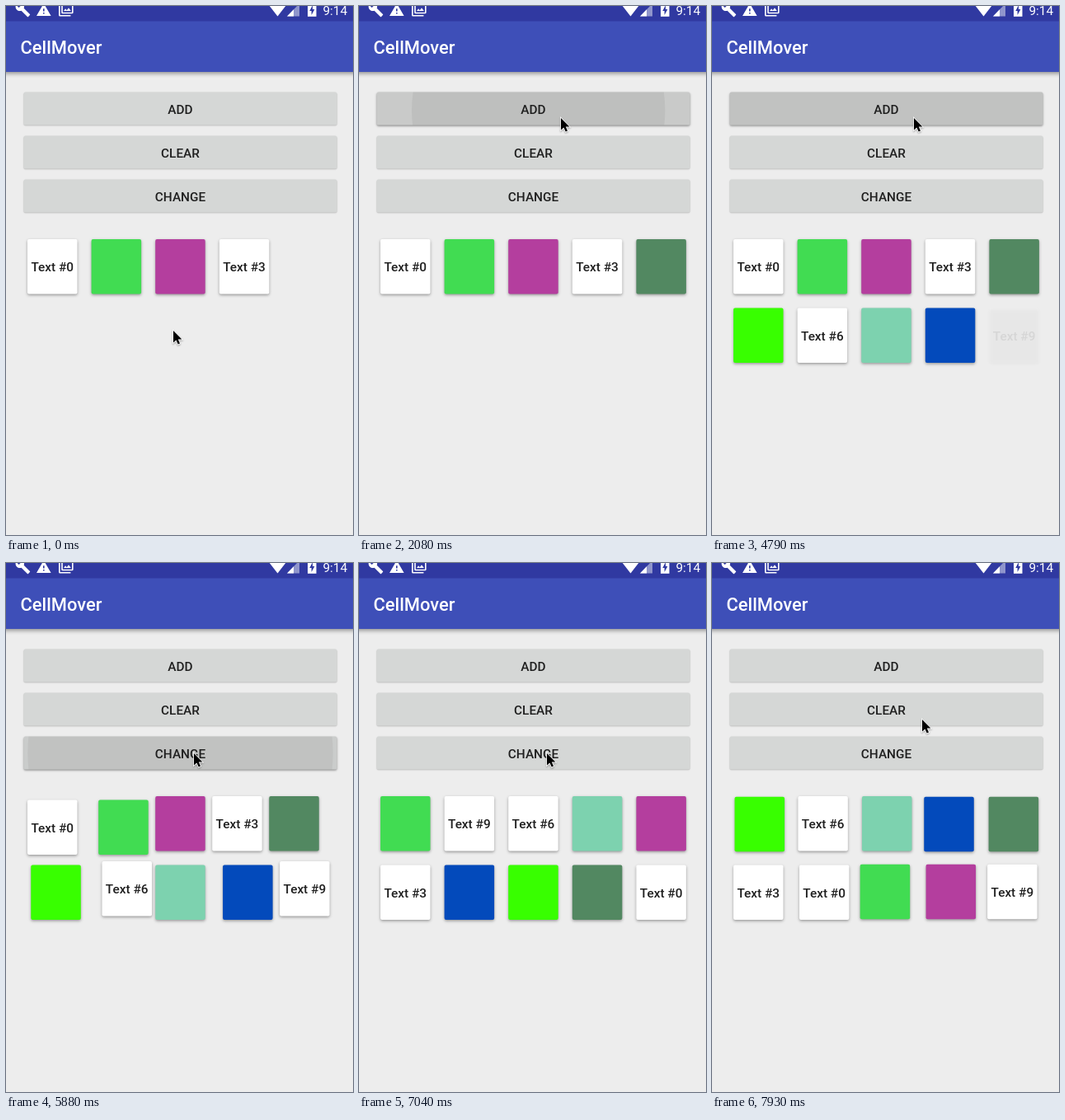
Animation of 421x642 px, one loop 7990 ms. Source, as an HTML page with a canvas:

```html
<!DOCTYPE html>
<html lang="en">
<head>
<meta charset="utf-8">
<title>Tile shuffle</title>
<style>
html, body { margin: 0; overflow: hidden; }
canvas { display: block; }
</style>
</head>
<body>
<canvas id="stage" width="421" height="642"></canvas>
<script>
const ctx = document.getElementById('stage').getContext('2d');
const LOOP = 7990;
const INK = '#1f1f1f';

const BUTTONS = [['ADD', 104.5], ['CLEAR', 157.5], ['CHANGE', 210.5]];
const COLORS = ['#fff', '#41dc52', '#b43e9e', '#fff', '#528861', '#38ff00', '#fff', '#7dd2af', '#034abb', '#fff'];

// button index, touch, ripple start, release
const CLICKS = [
  [0, 1150, 1200, 1380], [0, 1740, 1890, 2090], [0, 2550, 2590, 2760],
  [0, 3120, 3200, 3440], [0, 3760, 3830, 4050], [0, 4290, 4480, 4760],
  [2, 5620, 5645, 5847], [2, 6650, 6780, 6800], [2, 7550, 7570, 7650]
];
const FADE = 220;

// time each tile appears, after the first four
const ADDED = [1380, 2090, 2760, 3380, 4030, 4780];

const SHUFFLES = [
  { start: 5847, length: 225, order: '4329605718' },
  { start: 6800, length: 235, order: '1967238540' },
  { start: 7650, length: 300, order: '5678430129' }
];

const POINTER = [
  [30, 203, 394], [180, 163, 290], [440, 216, 138], [1150, 216, 138], [1300, 245, 136],
  [5000, 245, 136], [5290, 229, 230], [5440, 228, 231], [7740, 228, 231], [7930, 255, 190]
];

const ARROW = new Path2D('M0 0V14.6L3.4 11.5 5.7 16.6 8 15.6 5.8 10.6H10.4Z');
const ICONS = [
  [10.8, -5.2, 'M22.7 19l-9.1-9.1c.9-2.3.4-5-1.5-6.9-2-2-5-2.4-7.4-1.3L9 6 6 9 1.6 4.7C.4 7.1.9 10.1 2.9 12.1c1.9 1.9 4.6 2.4 6.9 1.5l9.1 9.1c.4.4 1 .4 1.4 0l2.3-2.3c.5-.4.5-1.1.1-1.4z'],
  [36.2, -4.8, 'M1 21h22L12 2zM13 18h-2v-2h2zM13 14h-2v-4h2z'],
  [63.2, -5.9, 'M16 10.3l-2.8 3.5-2-2.3L8.5 15h11zM3 5H1v16q0 2 2 2h16v-2H3zM21 1H7Q5 1 5 3v14q0 2 2 2h14q2 0 2-2V3q0-2-2-2zM21 17H7V3h14z']
].map(([x, y, d]) => [x, y, new Path2D(d)]);

const clamp = v => Math.max(0, Math.min(1, v));
const mix = (a, b, k) => a + (b - a) * k;
const ease = k => (1 - Math.cos(Math.PI * clamp(k))) / 2;

function shadow(alpha, blur, y) {
  ctx.shadowColor = `rgba(0,0,0,${alpha})`;
  ctx.shadowBlur = blur;
  ctx.shadowOffsetY = y;
}

function box(x, y, w, h, color) {
  ctx.fillStyle = color;
  ctx.beginPath();
  ctx.roundRect(x, y, w, h, 2);
  ctx.fill();
}

function text(str, x, y, size = 15.35, color = INK, align = 'center', weight = 500) {
  ctx.font = `${weight} ${size}px Roboto, sans-serif`;
  ctx.textAlign = align;
  ctx.fillStyle = color;
  ctx.fillText(str, x, y);
}

function polygon(color, ...points) {
  ctx.fillStyle = color;
  ctx.beginPath();
  points.forEach(([x, y]) => ctx.lineTo(x, y));
  ctx.fill();
}

function drawBars() {
  ctx.save();
  shadow(.4, 5, 2);
  ctx.fillStyle = '#3e4fb8';
  ctx.fillRect(-10, 0, 441, 80);
  ctx.restore();
  ctx.fillStyle = '#3039a1';
  ctx.fillRect(0, 0, 421, 18.5);
  text('CellMover', 17.5, 58, 21.9, '#fff', 'left');

  for (const [x, y, path] of ICONS) {
    ctx.save();
    ctx.translate(x, y);
    ctx.scale(.8, .8);
    ctx.fillStyle = '#fff';
    ctx.fill(path, 'evenodd');
    ctx.restore();
  }
  polygon('#fff', [319, -1], [329.5, 12.5], [340, -1]);
  polygon('#8f95cc', [341, 12.5], [356, 12.5], [356, -3]);
  polygon('#fff', [341, 12.5], [349, 12.5], [349, 4.3]);
  ctx.fillStyle = '#fff';
  ctx.fillRect(366, -3, 10.5, 15.8);
  polygon('#3039a1', [372, -1], [368.3, 6], [370.6, 6], [370.6, 11], [374.4, 4], [372, 4]);
  text('9:14', 414, 11, 15.35, '#fff', 'right', 400);
}

function pointerAt(t) {
  const next = POINTER.findIndex(p => p[0] > t);
  if (next === 0) return POINTER[0].slice(1);
  if (next < 0) return POINTER.at(-1).slice(1);
  const [a, b] = [POINTER[next - 1], POINTER[next]];
  const k = (t - a[0]) / (b[0] - a[0]);
  return [mix(a[1], b[1], k), mix(a[2], b[2], k)];
}

function drawButton([label, y], index, t, pointer) {
  const click = CLICKS.find(c => c[0] === index && t >= c[1] && t < c[3] + FADE);
  let level = 0;
  if (click) level = clamp((t - click[1]) / 80) * (1 - clamp((t - click[3]) / FADE));

  ctx.save();
  shadow(.22 + .2 * level, 1.5 + level, .8 + .5 * level);
  box(21.5, y, 380, 40, '#d5d7d6');
  ctx.restore();

  if (click) {
    ctx.save();
    box(21.5, y, 380, 40, `rgba(0,0,0,${.06 * level})`);
    ctx.clip();
    if (t >= click[2]) {
      const radius = 20 + .7 * (t - click[2]);
      const k = clamp((radius - 20) / 164);
      ctx.fillStyle = `rgba(0,0,0,${.055 * level})`;
      ctx.beginPath();
      ctx.arc(mix(pointer[0], 211.5, k), mix(pointer[1], y + 20, k), radius, 0, 7);
      ctx.fill();
    }
    ctx.restore();
  }
  text(label, 211.5, y + 26);
}

function slot(i) {
  return [26 + 77.6 * (i % 5), i < 5 ? 283 : 366.5];
}

function drawTile(id, t) {
  const alpha = id < 4 ? 1 : clamp((t - ADDED[id - 4]) / 130);
  if (!alpha) return;
  let [x, y] = slot(id);
  for (const { start, length, order } of SHUFFLES) {
    const [toX, toY] = slot(order.indexOf(id));
    const k = ease((t - start) / length);
    x = mix(x, toX, k);
    y = mix(y, toY, k);
  }
  ctx.save();
  ctx.globalAlpha = alpha;
  shadow(.36, 3.5, 1.5);
  box(x, y, 60.5, 66.5, COLORS[id]);
  shadow(0, 0, 0);
  if (id % 3 === 0) text('Text #' + id, x + 30.2, y + 39.3);
  ctx.restore();
}

function drawPointer([x, y]) {
  ctx.save();
  ctx.translate(x, y);
  shadow(.35, 2, 1);
  ctx.strokeStyle = '#fff';
  ctx.lineWidth = 1.6;
  ctx.stroke(ARROW);
  shadow(0, 0, 0);
  ctx.fillStyle = '#000';
  ctx.fill(ARROW);
  ctx.restore();
}

function draw(now) {
  const t = now % LOOP;
  const pointer = pointerAt(t);
  ctx.fillStyle = '#ededed';
  ctx.fillRect(0, 0, 421, 642);
  drawBars();
  BUTTONS.forEach((button, i) => drawButton(button, i, t, pointer));
  COLORS.forEach((_, id) => drawTile(id, t));
  drawPointer(pointer);
}

const began = performance.now();
function tick() {
  draw(performance.now() - began);
  requestAnimationFrame(tick);
}
tick();
</script>
</body>
</html>
```
